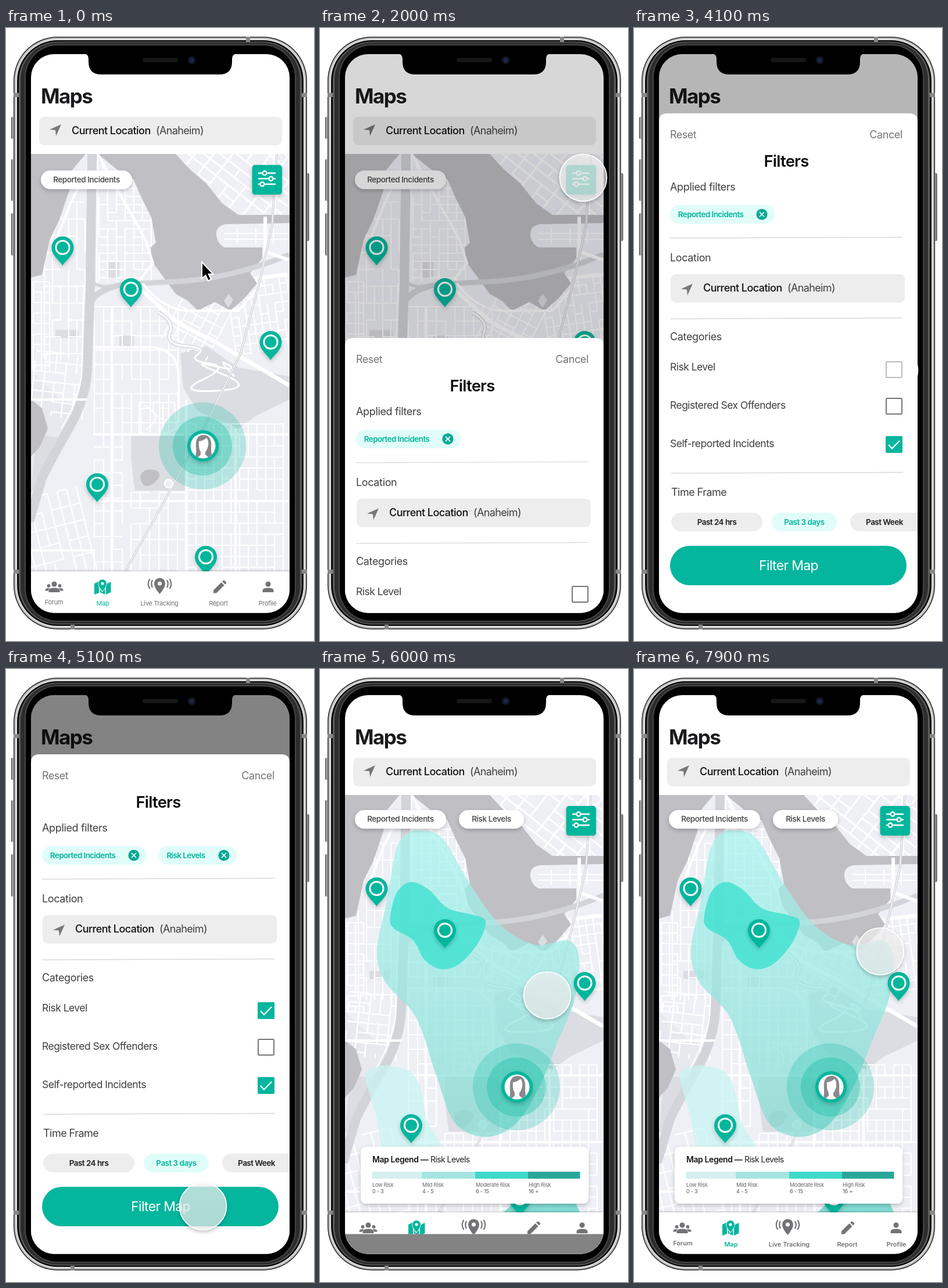
Animation, 530 px wide and 1056 px high, one loop 8 s. Source, as an HTML page:

```html
<!DOCTYPE html>
<html lang="en">
<head>
<meta charset="utf-8">
<title>Map filters</title>
<style>
html, body { margin: 0; width: 100%; height: 100%; overflow: hidden; background: #fff; }
svg { display: block; width: 530px; height: 1056px; }
text { font-family: Inter, "Open Sans", sans-serif; white-space: pre; }
</style>
</head>
<body>
<svg id="stage" viewBox="0 0 530 1056" xmlns="http://www.w3.org/2000/svg"></svg>
<script>
const TEAL = '#04b69d', INK = '#3f3f42', GREY = '#737376';

// ---- drawing helpers ----
const rect = (x, y, w, h, fill, r = 0, extra = '') =>
  `<rect x="${x}" y="${y}" width="${w}" height="${h}" rx="${r}" fill="${fill}" ${extra}/>`;
const disc = (x, y, r, fill, extra = '') => `<circle cx="${x}" cy="${y}" r="${r}" fill="${fill}" ${extra}/>`;
const shape = (d, fill, extra = '') => `<path d="${d}" fill="${fill}" ${extra}/>`;
const line = (d, color, width, extra = '') =>
  `<path d="${d}" fill="none" stroke="${color}" stroke-width="${width}" ${extra}/>`;
// y is the middle of the capitals
const label = (x, y, size, weight, fill, str, anchor = 'start', track = -.03) =>
  `<text x="${x}" y="${y + size * .36}" font-size="${size}" font-weight="${weight}" fill="${fill}" text-anchor="${anchor}" letter-spacing="${track}em">${str}</text>`;
const group = (body, extra = '') => `<g ${extra}>${body}</g>`;

// closed smooth outline through "x,y x,y ..."
function blob(points) {
  const p = points.split(' ').map(s => s.split(',').map(Number)), n = p.length;
  const at = i => p[(i + n) % n];
  let d = `M${p[0]}`;
  p.forEach((_, i) => {
    const [a, b, c, e] = [at(i - 1), at(i), at(i + 1), at(i + 2)];
    const c1 = b.map((v, k) => v + (c[k] - a[k]) / 6), c2 = c.map((v, k) => v - (e[k] - b[k]) / 6);
    d += `C${c1} ${c2} ${c}`;
  });
  return d + 'Z';
}

let seed = 11;
const rand = () => (seed = seed * 16807 % 2147483647) / 2147483647;

// street grid with a few missing blocks
function streets(x, y, w, h, dx, dy, width = 2.2) {
  let d = '';
  for (let i = 0; i <= w; i += dx)
    for (let j = 0; j < h; j += dy) {
      if (rand() < .86) d += `M${x + i} ${y + j}v${Math.min(dy, h - j)}`;
      if (i + dx <= w + 1 && rand() < .8) d += `M${x + i} ${y + j}h${dx}`;
    }
  return line(d, '#fff', width);
}

// ---- map ----
function cityMap() {
  const water = '#c0c0c4', soft = '#dcdde2', road = '#d3d4d9';
  return group(
    rect(43, 217, 445, 720, '#eff0f6') +
    shape('M300 560L345 548 400 585 488 600V640L430 668 400 690 330 660 305 620Z', soft) +
    shape('M215 703H310V797H222Q214 750 215 703Z', soft) +
    shape('M43 590L95 640 128 650 60 760 43 790Z', '#e8e9ef') +
    shape('M52 700L92 705 60 790 43 800Z', soft) +
    rect(175, 402, 20, 28, soft) + rect(85, 520, 40, 14, soft) + rect(195, 530, 25, 20, soft) +
    streets(66, 300, 70, 270, 14, 29) + streets(47, 437, 28, 155, 14, 18) +
    group(streets(48, 560, 90, 110, 18, 17), 'transform="rotate(6 90 600)"') +
    streets(160, 262, 90, 175, 15, 14) + streets(152, 480, 150, 220, 16, 25) +
    streets(152, 700, 62, 236, 16, 22) + streets(312, 682, 176, 254, 15, 19) +
    streets(215, 800, 96, 136, 16, 27) +
    group(streets(20, 800, 130, 150, 17, 29), 'transform="rotate(-14 90 870)"') +
    group(streets(385, 430, 120, 130, 13, 16), 'transform="rotate(-8 430 480)"') +
    group(streets(290, 455, 100, 100, 17, 18), 'transform="rotate(28 320 500)"') +
    group(group(streets(260, 120, 250, 260, 26, 17, 3), 'transform="rotate(38 390 260)"'), 'clip-path="url(#north)"') +
    shape('M43 217H137L112 247 109 280 92 330 75 365 67 402 62 425 43 430Z', water) +
    shape('M158 217H292L318 245 345 268 372 302 400 322H488V336L378 338Q361 341 362 356T376 378H441V397L420 422 432 440 410 466 386 487 360 472 330 487 313 470 292 458 270 428 251 402 249 378 258 370 250 326 232 290 219 260 190 243Z', water) +
    shape('M43 640L62 655 72 690 58 722 43 738Z', water) +
    shape('M368 345H488V372H380Q366 370 368 345Z', '#eff0f6') +
    line('M375 354H488M375 364H488M398 345V372M430 345V372M460 345V372', '#fff', 2) +
    shape('M375 470l8-12 8 10-8 14Z', soft) +
    line('M158 217L240 365 253 405 226 440M149 225L112 300 84 370M165 235L230 345', '#fff', 4) +
    line('M148 217L145 440 140 590Q137 640 108 690T62 775L40 850', road, 16) +
    line('M158 217L156 440M134 440L130 600Q120 650 95 690', '#fff', 2) +
    line('M145 470Q165 445 205 442T290 437Q390 432 488 390', road, 9) +
    line('M146 435Q160 450 186 443M147 475Q158 455 190 447', road, 5) +
    line('M446 325V400M446 385L488 400M438 430L488 425M462 217V322', '#fff', 6) +
    line('M218 440Q252 467 275 490T350 535L488 616', '#fff', 7) +
    line('M235 440Q265 480 308 487H400L440 440M150 550H250Q296 553 297 600V680', '#fff', 4) +
    line('M310 640V936M182 480V936M43 640H140M150 700H488M152 815H488M43 900H150M395 690V936', '#fff', 4) +
    line('M262 490Q290 505 282 525T310 548 330 562 350 578 338 606 362 625 372 596 357 582 382 580 393 600', soft, 7) +
    line('M262 490Q290 505 282 525T310 548 330 562 350 578 338 606 362 625 372 596 357 582 382 580 393 600', '#fff', 3) +
    line('M229 645H290L293 690Q265 705 229 697ZM238 650Q275 670 240 692M255 645Q245 672 290 680M270 645V700', '#fff', 2) +
    line('M466 217L458 340 438 430 404 560 340 690 270 820 205 936', road, 4) +
    line('M466 217L458 340 438 430 404 560 340 690 270 820 205 936', '#f6f6fa', 1.5) +
    shape(blob('231,773 240,762 258,762 264,772 252,786 238,788'), water) +
    disc(280, 785, 7, '#eff0f6', 'stroke="#fff" stroke-width="2.5"'),
    'clip-path="url(#mapArea)"');
}

const pin = (x, y) => group(
  shape(`M${x} ${y + 31}C${x - 5} ${y + 23} ${x - 19} ${y + 14} ${x - 19} ${y}a19 19 0 0 1 38 0C${x + 19} ${y + 14} ${x + 5} ${y + 23} ${x} ${y + 31}Z`, TEAL) +
  disc(x, y, 11.6, 'none', 'stroke="#fff" stroke-width="3"'), 'filter="url(#soft)"');

const avatar = () =>
  disc(338, 720, 75, TEAL, 'opacity=".24"') + disc(338, 720, 51, TEAL, 'opacity=".32"') +
  group(disc(339, 720, 27, TEAL), 'filter="url(#soft)"') + disc(339, 720, 21.5, '#fff') +
  group(
    shape('M325 741C329 733 326 722 327 713Q329 701 340 701T353 714C354 724 351 732 357 741Z', '#89898c') +
    shape('M332 712Q340 711 345 706 349 711 348 719 346 728 343 730V735L350 741H329L335 735V730Q331 725 332 712Z', '#fff'),
    'clip-path="url(#face)"');

const risk = () => group(
  shape(blob('170,278 210,291 258,370 310,441 370,475 428,468 446,500 438,570 410,640 375,725 335,785 285,806 232,782 200,700 165,600 113,540 98,485 115,400 130,315 148,285'), 'url(#riskTone)') +
  shape(blob('157,367 187,380 220,412 265,424 285,435 272,472 240,508 208,517 180,501 160,467 126,446 121,425 133,384'), '#3ce2d0', 'opacity=".8"') +
  shape(blob('79,702 98,685 125,684 157,695 174,726 185,780 208,830 150,860 110,830 97,770'), '#c8f4f2', 'opacity=".75"') +
  shape('M316 936L338 915H438L447 936Z', '#6fd8cd', 'opacity=".85"'), 'clip-path="url(#mapArea)"');

const chevron = (x, y) => shape(`M${x - 10} ${y - 1}L${x + 10} ${y - 10} ${x + 1} ${y + 10} ${x} ${y}Z`, '#77777a');

const place = (x, y) => label(x, y, 18, 500, '#111', 'Current Location') + label(x + 145, y, 18, 400, INK, '(Anaheim)', 'start', -.035);

const pill = (x, y, w, str) => group(rect(x, y, w, 32, '#fff', 16), 'filter="url(#soft)"') +
  label(x + w / 2, y + 15.5, 13.5, 500, INK, str, 'middle');

const filterButton = () => {
  const row = (y, x) => `M435 ${y}H${x - 3.5}M${x + 3.5} ${y}H463M${x - 3.5} ${y}a3.5 3.5 0 1 0 7 0a3.5 3.5 0 1 0 -7 0`;
  return group(rect(423.5, 236, 51.5, 51, TEAL, 5), 'filter="url(#soft)"') +
    line(row(250, 445) + row(259.5, 456) + row(269, 441), '#fff', 2.4, 'stroke-linecap="round"');
};

const legend = () => {
  const bands = [[90, 175, '#d4f0ef', 'Low Risk', '0 - 3'], [175, 267, '#a5e4e0', 'Mild Risk', '4 - 5'],
    [267, 358, '#3ed9c8', 'Moderate Risk', '6 - 15'], [358, 447.5, '#2aa699', 'High Risk', '16 +']];
  return group(rect(70, 823, 392, 98, '#fff', 9), 'filter="url(#soft)"') +
    label(90, 845, 14, 600, '#151515', 'Map Legend —') + label(190, 845, 14, 400, '#222', 'Risk Levels', 'start', -.04) +
    bands.map(([a, b, color, name, range], i) => rect(a, 866, b - a, 12, color) +
      label(i ? a + 1 : a, 888.5, 9.2, 400, '#666', name) + label(i ? a + 1 : a, 900, 9.2, 400, '#555', range)).join('');
};

function nav(weight, spots) {
  const names = ['Forum', 'Map', 'Live Tracking', 'Report', 'Profile'];
  const person = (x, y, s) => disc(x, y - 5 * s, 4.6 * s, GREY) +
    shape(`M${x - 9.5 * s} ${y + 9 * s}v${-3 * s}q0 ${-4.5 * s} ${9.5 * s} ${-4.5 * s}t${9.5 * s} ${4.5 * s}v${3 * s}Z`, GREY);
  const drop = (x, y, r, fill) => shape(`M${x} ${y + r * 2.1}C${x - r * .5} ${y + r * 1.3} ${x - r} ${y + r * .8} ${x} ${y - r}`, 'none') +
    shape(`M${x} ${y + r * 1.9}Q${x - r} ${y + r * .75} ${x - r} ${y}a${r} ${r} 0 0 1 ${2 * r} 0Q${x + r} ${y + r * .75} ${x} ${y + r * 1.9}Z`, fill);
  return group(rect(43, 936, 445, 72, '#fff'), 'filter="url(#navShade)"') +
    person(73.5, 964, .62) + person(92.5, 964, .62) +
    group(person(83, 963, 1), 'stroke="#fff" stroke-width="1.2" paint-order="stroke"') +
    shape('M152 957L160 953V973L152 976ZM161.5 953L170.500 958V976L161.500 972ZM172 958L180.500 954V972L172 976Z', TEAL) +
    group(drop(166, 957, 7, TEAL), 'stroke="#fff" stroke-width="1.6" paint-order="stroke"') + disc(166, 957, 2.6, '#fff') +
    drop(264.5, 957, 9.5, GREY) + disc(264.5, 957, 3.6, '#fff') +
    line('M252 951q-3.500 6 0 13M247.500 949q-5.500 8.500 0 17M277 951q3.500 6 0 13M281.500 949q5.500 8.500 0 17', GREY, 2.2) +
    shape('M357 968.500L370.500 955 375.500 960 362 973.500H357ZM372 953.500L374.500 951.500Q376 951 379.300 955.200 379.500 956 377 958.500Z', GREY) +
    person(451, 963, 1) +
    names.map((name, i) => label(spots[i], i ? 991.5 : 989, 11, weight, i === 1 ? TEAL : GREY, name, 'middle', weight > 400 ? -.005 : -.03)).join('');
}

const title = () => label(60, 117, 35, 700, '#1b1b1d', 'Maps', 'start', -.045);

const mapScreen = withRisk => rect(43, 45, 445, 963, '#fff') + title() +
  rect(57, 153, 418, 49, '#ededed', 9) + chevron(85, 176) + place(113, 177) + cityMap() +
  (withRisk ? risk() : '') +
  [[97.5, 378], [215, 450], [455.5, 541], [157, 786], [344, 911]].map(p => pin(...p)).join('') + avatar() +
  (withRisk ? pill(60, 243, 157, 'Reported Incidents') + pill(239, 243, 112, 'Risk Levels') + legend()
    : pill(60, 245.5, 157, 'Reported Incidents')) +
  filterButton() + (withRisk ? nav(600, [84, 167, 267, 367, 451.5]) : nav(400, [82.5, 166.5, 264, 365.5, 450]));

// ---- filter sheet ----
const chip = (x, w, str) => rect(x, 305, w, 32, '#e0fdfa', 16) +
  label(x + (w - 42) / 2 + 1, 321, 13.5, 600, TEAL, str, 'middle', -.045) +
  disc(x + w - 22, 321, 9.6, '#08a995') + line(`M${x + w - 26} 317l8 8m0 -8l-8 8`, '#fff', 1.7);

const box = y => rect(434, y + 1, 27, 27, '#fff', 1.5, 'stroke="#77777a" stroke-width="2"');
const ticked = y => rect(433, y, 29, 29, TEAL, 2) + line(`M438 ${y + 15}l6 6.500 13 -13.500`, '#fff', 2.2);
const option = (x, w, fill, color, str, mid = x + w / 2) =>
  rect(x, 835, w, 32, fill, 16) + label(mid, 851, 13.5, 600, color, str, 'middle', -.04);

const sheet = () =>
  shape('M43 1010V161Q43 147 57 147H474Q488 147 488 161V1010Z', '#fff') +
  label(62, 184, 18, 400, GREY, 'Reset') + label(462, 184, 18, 400, GREY, 'Cancel', 'end', -.02) +
  label(262, 229, 27.5, 600, '#0c0c0c', 'Filters', 'middle') +
  label(62, 274, 18, 400, INK, 'Applied filters', 'start', -.02) + chip(62, 180, 'Reported Incidents') +
  line('M62 362L462 360.500M62 501L462 499.500M64 767L463 765.500', '#d9d9db', 1.4) +
  label(62, 396, 18, 400, INK, 'Location', 'start', -.02) +
  rect(63, 424, 403, 49, '#ededed', 9) + chevron(91, 450.5) + place(119, 448) +
  label(62, 532, 18, 400, INK, 'Categories', 'start', -.02) +
  label(62, 583.5, 17.5, 400, INK, 'Risk Level') +
  label(62, 649.5, 17.5, 400, INK, 'Registered Sex Offenders') +
  label(62, 716, 17.5, 400, INK, 'Self-reported Incidents') +
  box(574) + box(637) + ticked(703) +
  label(64, 800, 18, 400, INK, 'Time Frame') +
  option(64, 157, '#ededed', '#1b1b1d', 'Past 24 hrs') + option(237, 112, '#e0fdfa', TEAL, 'Past 3 days') +
  option(372, 150, '#ededed', '#1b1b1d', 'Past Week', 431) +
  rect(62, 892, 407, 68, TEAL, 34) + label(266, 926, 23, 400, '#fff', 'Filter Map', 'middle') +
  group(chip(262, 135, 'Risk Levels') + ticked(574), 'id="picked"');

// ---- phone ----
const shell = (dx, dy, fill) => rect(13 + dx, 15 + dy, 505 - 2 * dx, 1021 - 2 * dy, fill, 76 - dx);
const phone = () =>
  [[153, 38], [226, 72], [319, 73]].map(([y, h]) => rect(9, y, 8, h, 'url(#metal)', 2)).join('') +
  rect(514, 250, 7.500, 117, 'url(#metal)', 2) +
  shell(0, 0, '#222') + shell(1.500, 1.500, '#c4c4c3') + shell(4.500, 4.500, '#f0f0ee') + shell(6, 6, '#090909') +
  shell(9, 8.500, '#5c5c5c') + shell(12, 10, '#2d2d2d') + shell(19, 13, '#444') + shell(21, 15, '#000') +
  rect(13, 112, 9, 7, '#888') + rect(509, 112, 9, 7, '#888') + rect(13, 933, 9, 7, '#888') + rect(509, 933, 9, 7, '#888') +
  rect(413, 15, 7, 9, '#888') + rect(111, 1028, 7, 8, '#888');
const notch = () =>
  shape('M134 44Q142 45 142 53V58Q142 80 164 80H367Q389 80 389 58V53Q389 45 397 44Z', '#000') +
  rect(235, 51.500, 61, 7.500, '#171719', 4) + disc(319.500, 55.500, 7, '#11131c') + disc(319.500, 55.500, 4, '#1c2547');

const shade = (id, dy, blur, alpha) => `<filter id="${id}" x="-40%" y="-40%" width="180%" height="190%">
  <feDropShadow dx="0" dy="${dy}" stdDeviation="${blur}" flood-color="#000" flood-opacity="${alpha}"/></filter>`;
const clip = (id, body) => `<clipPath id="${id}">${body}</clipPath>`;

const stage = document.getElementById('stage');
stage.innerHTML = `<defs>
  ${shade('soft', 3, 3.5, .22)}${shade('navShade', -1, 1.5, .25)}${shade('touchShade', 3, 3, .3)}
  ${clip('screen', rect(43, 45, 445, 962.5, '#000', 40))}${clip('mapArea', rect(43, 217, 445, 720, '#000'))}
  ${clip('north', rect(270, 217, 218, 110, '#000'))}${clip('face', disc(339, 720, 21.5, '#000'))}
  <linearGradient id="metal"><stop stop-color="#333"/><stop offset=".45" stop-color="#ddd"/><stop offset="1" stop-color="#333"/></linearGradient>
  <linearGradient id="riskTone" x2="0" y2="1"><stop stop-color="#a5f3ee" stop-opacity=".72"/><stop offset="1" stop-color="#8cdcd5" stop-opacity=".78"/></linearGradient>
  <linearGradient id="touchTone" x2="0" y2="1"><stop stop-color="#f6f6f6"/><stop offset="1" stop-color="#efefef"/></linearGradient>
  </defs>` + rect(0, 0, 530, 1056, '#fff') + phone() +
  group(
    group(mapScreen(false), 'id="plain"') + group(mapScreen(true), 'id="risky"') +
    group(group(rect(43, 45, 445, 963, '#fff') + title(), 'id="backing"') +
      rect(43, 45, 445, 963, '#000', 0, 'id="dim"') + group(sheet(), 'id="sheet"'), 'id="overlay"'),
    'clip-path="url(#screen)"') + notch() +
  shape('M337 403V431.500L343.500 426 347.800 435.500 353 433 348.700 424H356.500Z', '#000', 'id="arrow" stroke="#fff" stroke-width="2"') +
  group(disc(0, 0, 40.500, 'url(#touchTone)', 'id="lens" fill-opacity=".68" stroke="#fff" stroke-width="1.600"'), 'id="touch"');

// ---- motion ----
const el = Object.fromEntries([...stage.querySelectorAll('[id]')].map(n => [n.id, n]));
const set = (n, name, v) => n.setAttribute(name, v);
const show = (n, on) => set(n, 'display', on ? 'inline' : 'none');
const part = (t, start, length) => Math.min(1, Math.max(0, (t - start) / length));
const ease = p => p < .5 ? 2 * p * p : 1 - 2 * (1 - p) ** 2;

const path = [[0, 350, 410], [600, 385, 350], [900, 415, 300], [1200, 453, 258], [2000, 453, 258], [2200, 430, 275],
  [2400, 374, 319], [2800, 355, 390], [3200, 385, 520], [3600, 425, 585], [3800, 448, 590], [4500, 448, 590],
  [4900, 345, 925], [5300, 333, 926], [5500, 332, 913], [6000, 391, 562], [6500, 420, 492], [8000, 424, 486]];
function touchAt(t) {
  const i = path.findIndex(k => k[0] > t), [a, b] = [path[i - 1], path[i]];
  const p = part(t, a[0], b[0] - a[0]);
  return [1, 2].map(k => a[k] + (b[k] - a[k]) * p);
}

function draw(t) {
  const rise = ease(part(t, 1737, 500)), pick = part(t, 4150, 300), leave = ease(part(t, 5186, 940));
  const leaving = t >= 5186, pressed = t >= 3850 && t < 4400;
  show(el.plain, !leaving);
  show(el.risky, leaving);
  show(el.overlay, rise > 0 && leave < 1);
  show(el.backing, leaving);
  set(el.overlay, 'transform', `translate(0 ${963 * leave})`);
  set(el.sheet, 'transform', `translate(0 ${861 * (1 - rise)})`);
  set(el.dim, 'opacity', .286 * rise + .2 * pick);
  set(el.picked, 'opacity', pick);
  show(el.arrow, t < 100);
  show(el.touch, t >= 100);
  set(el.touch, 'transform', `translate(${touchAt(t)})`);
  set(el.touch, 'filter', pressed ? 'none' : 'url(#touchShade)');
  set(el.lens, 'fill', pressed ? '#fff' : 'url(#touchTone)');
  set(el.lens, 'fill-opacity', pressed ? .5 : .68);
}

const began = performance.now();
function tick() {
  const t = (performance.now() - began) % 8000;
  draw(Math.floor(t / 100) * 100);
  requestAnimationFrame(tick);
}
tick();
</script>
</body>
</html>
```
